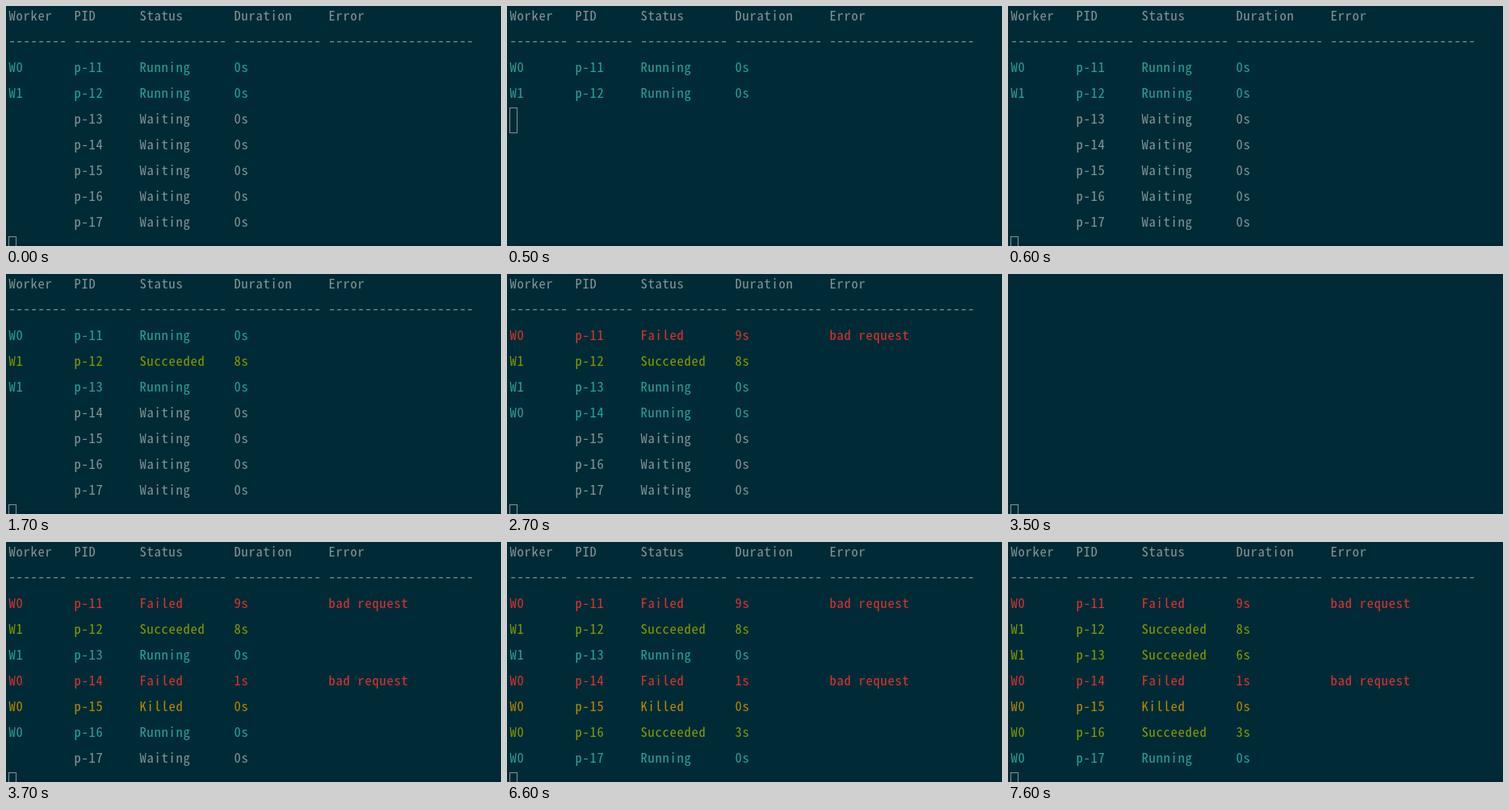
These frames come from a looping animation (613 by 298 pixels, 8000 ms). An HTML page:

```html
<!DOCTYPE html>
<html lang="en">
<head>
<meta charset="utf-8">
<title>Worker table</title>
<style>
  html, body { margin: 0; width: 100%; height: 100%; overflow: hidden; background: #002b36; }
  svg { display: block; }
  text { white-space: pre; }
</style>
</head>
<body>
<svg id="screen" width="613" height="298" viewBox="0 0 613 298">
  <rect x="13" y="294" width="600" height="4" fill="#002731"/>
  <rect id="cursor" x="3.5" width="9" height="31" fill="#002b36" stroke="#839496"/>
</svg>
<script>
const LOOP = 8000, ROW = 32, CHAR = 9, LEFT = 3;
const FONT = '16.5px "Noto Sans Mono CJK JP", "Noto Sans Mono", monospace';
const WIDTHS = [8, 8, 12, 12, 20];
const COLORS = {
  Waiting: '#839496', Running: '#2aa198', Succeeded: '#859900',
  Failed: '#dc322f', Killed: '#b58900'
};
// worker, start ms, end ms, final status, duration, error
const JOBS = [
  ['W0', 0, 2700, 'Failed', '9s', 'bad request'],
  ['W1', 0, 1700, 'Succeeded', '8s', ''],
  ['W1', 1700, 7600, 'Succeeded', '6s', ''],
  ['W0', 2700, 3500, 'Failed', '1s', 'bad request'],
  ['W0', 3500, 3500, 'Killed', '0s', ''],
  ['W0', 3500, 6600, 'Succeeded', '3s', ''],
  ['W0', 6600, LOOP, 'Succeeded', '1s', '']
];

const screen = document.getElementById('screen');
const cursor = document.getElementById('cursor');

// Terminal cells are a whole number of pixels wide, whatever the font's advance.
const pen = document.createElement('canvas').getContext('2d');
pen.font = FONT;
const spacing = CHAR - pen.measureText('0').width;
screen.style.font = FONT;
screen.style.letterSpacing = spacing + 'px';

const lines = Array.from({ length: JOBS.length + 2 }, (_, i) => {
  const line = document.createElementNS('http://www.w3.org/2000/svg', 'text');
  line.setAttribute('y', 18 + ROW * i);
  let x = LEFT + spacing / 2;
  for (const width of WIDTHS) {
    const cell = document.createElementNS('http://www.w3.org/2000/svg', 'tspan');
    cell.setAttribute('x', x);
    line.append(cell);
    x += (width + 1) * CHAR;
  }
  return screen.appendChild(line);
});

function setLine(i, cells, color) {
  lines[i].setAttribute('fill', color);
  cells.forEach((s, k) => {
    const cell = lines[i].children[k];
    if (cell.textContent !== s) cell.textContent = s;
  });
}

setLine(0, ['Worker', 'PID', 'Status', 'Duration', 'Error'], COLORS.Waiting);
setLine(1, WIDTHS.map(n => '-'.repeat(n)), COLORS.Waiting);
lines[1].setAttribute('y', 17 + ROW);

function draw(now) {
  const t = now % LOOP;
  JOBS.forEach(([worker, start, end, result, duration, error], i) => {
    const done = t >= end;
    const status = done ? result : t >= start ? 'Running' : 'Waiting';
    setLine(i + 2, [
      t >= start ? worker : '', 'p-' + (11 + i), status,
      done ? duration : '0s', done ? error : ''
    ], COLORS[status]);
  });

  // Redraws caught midway: a half-printed table, then a cleared one.
  const partial = t >= 500 && t < 600;
  const cleared = t >= 3500 && t < 3700;
  const shown = cleared ? 0 : partial ? 4 : lines.length;
  lines.forEach((line, i) => line.setAttribute('visibility', i < shown ? 'visible' : 'hidden'));
  cursor.setAttribute('y', (partial ? 4 : lines.length) * ROW - 1.5);
  requestAnimationFrame(draw);
}
draw(0);
</script>
</body>
</html>
```
